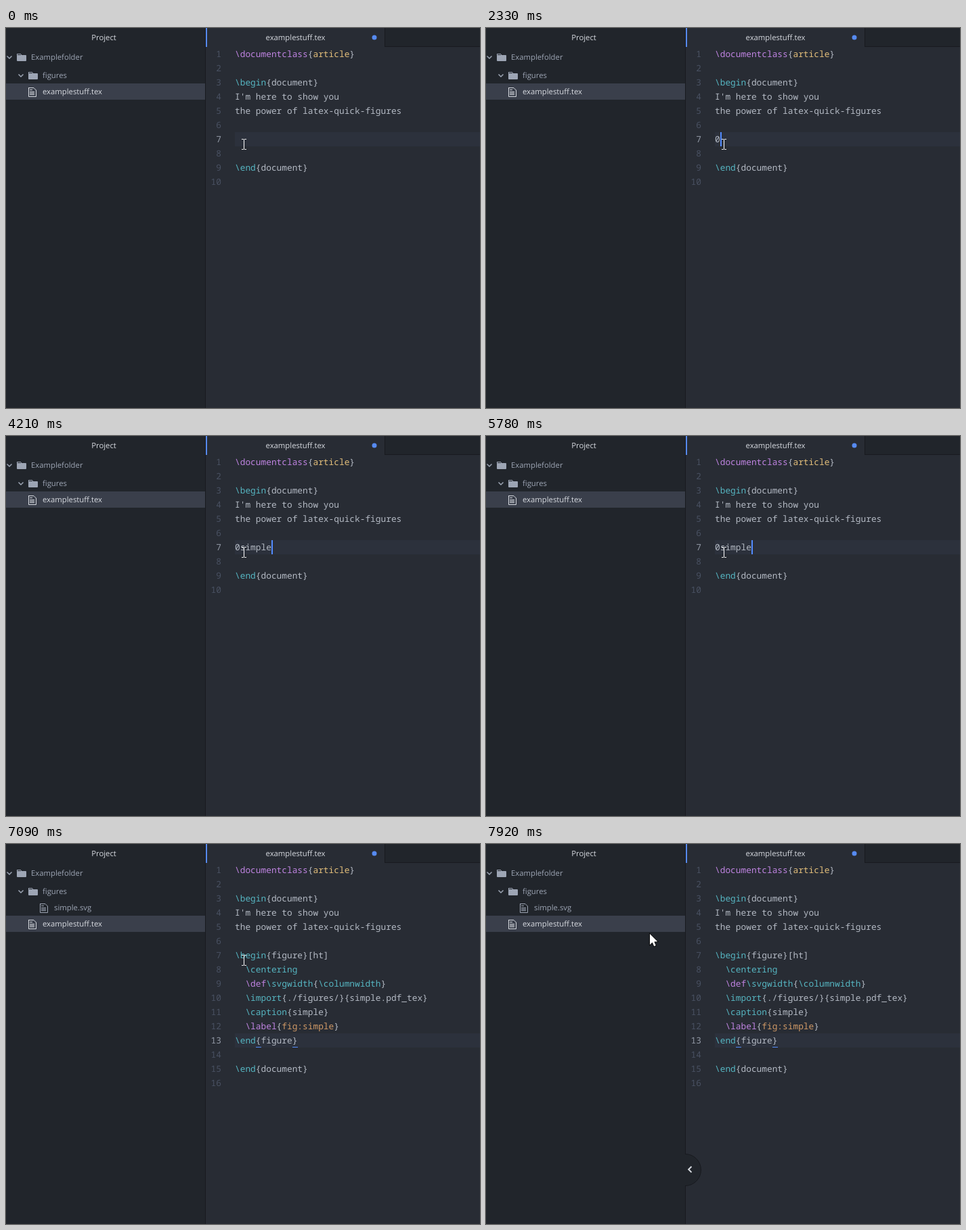
An HTML page with a canvas that plays this animation: 700x562 px, repeating every 8000 ms.

```html
<!DOCTYPE html>
<html lang="en">
<head>
<meta charset="utf-8">
<title>Editor snippet expansion</title>
<style>
  html, body { margin: 0; width: 100%; height: 100%; overflow: hidden; background: #282c34; }
  canvas { display: block; }
</style>
</head>
<body>
<canvas id="stage" width="700" height="562"></canvas>
<script>
const ctx = document.getElementById('stage').getContext('2d');
const LOOP = 8000;
const CELL = 7.697, LINE = 21, CODE_X = 338, CODE_Y = 28;
const CODE_FONT = '12.83px "Noto Sans Mono", monospace';
const UI_FONT = '11.3px "Open Sans", sans-serif';
const C = {
  editor: '#282c34', panel: '#21252b', border: '#181a1f', selected: '#3a3f4b',
  row: '#2c313c', gutter: '#495162', gutterActive: '#9299a6', accent: '#568af2',
  caret: '#528bff', ui: '#9da5b4', bright: '#d7dae0',
  text: '#b4bac4', cyan: '#56b6c2', purple: '#c084e2', yellow: '#e5c07b', orange: '#d19a66'
};

// Each line is a flat list of colour name, text pairs.
const command = (name, arg, color = 'cyan', argColor = 'text') =>
  [color, '\\' + name, 'text', '{', argColor, arg, 'text', '}'];
const indent = line => ['text', '  ', ...line];
const head = [
  command('documentclass', 'article', 'purple', 'yellow'),
  [],
  command('begin', 'document'),
  ['text', "I'm here to show you"],
  ['text', 'the power of latex-quick-figures'],
  []
];
const tail = [[], command('end', 'document'), []];
const figure = [
  [...command('begin', 'figure'), 'text', '[ht]'],
  indent(['cyan', '\\centering']),
  indent(['purple', '\\def', 'cyan', '\\svgwidth', 'text', '{', 'cyan', '\\columnwidth', 'text', '}']),
  indent([...command('import', './figures/'), 'text', '{simple.pdf_tex}']),
  indent(command('caption', 'simple')),
  indent(command('label', 'fig:simple', 'purple', 'orange')),
  command('end', 'figure')
];

const typing = [[1580, '0'], [3270, '0s'], [3360, '0si'], [3550, '0sim'],
  [3740, '0simp'], [4030, '0simpl'], [4210, '0simple']];
const EXPAND = 5970;
const caretOn = [[460, 830], [1220, 1860], [2330, 2710], [3080, 4580],
  [4950, 5330], [5780, 6250], [6710, 7090], [7460, 7830]];
// time, pointer x, pointer y, dock button offset
const pointer = [[7550, 298, 136, -22], [7640, 260, 133, -9], [7740, 249, 133, -2],
  [7830, 244, 133, 0], [7920, 242, 133, 0]];

const latest = (steps, t) => steps.filter(s => s[0] <= t).pop();

function rect(color, x, y, w, h) {
  ctx.fillStyle = color;
  ctx.fillRect(x, y, w, h);
}

function label(text, x, y, color, align = 'left') {
  ctx.font = UI_FONT;
  ctx.textAlign = align;
  ctx.fillStyle = color;
  ctx.fillText(text, x, y);
}

function polyline(points, color, width) {
  ctx.beginPath();
  points.forEach(([x, y]) => ctx.lineTo(x, y));
  ctx.strokeStyle = color;
  ctx.lineWidth = width;
  ctx.stroke();
}

function folder(name, x, cy) {
  polyline([[x - 14.5, cy - 1.5], [x - 11, cy + 2], [x - 7.5, cy - 1.5]], C.ui, 1.5);
  rect(C.ui, x, cy - 5, 6, 1);
  rect(C.ui, x, cy - 4, 1, 2);
  rect(C.ui, x + 6, cy - 4, 1, 1);
  ctx.beginPath();
  ctx.roundRect(x, cy - 3, 14, 9, 1);
  ctx.fill();
  label(name, x + 21, cy + 4, C.ui);
}

function file(name, x, cy, color) {
  polyline([[x + .5, cy - 5.5], [x + 8, cy - 5.5], [x + 11.5, cy - 2], [x + 11.5, cy + 7.5],
    [x + .5, cy + 7.5], [x + .5, cy - 6]], color, 1);
  rect(color, x + 2, cy - 3, 4, 1);
  for (let i = 0; i < 3; i++) rect(color, x + 2, cy + 2 * i, 7, 1);
  label(name, x + 21, cy + 4, color);
}

function sidebar(expanded) {
  rect(C.panel, 0, 0, 294, 562);
  rect(C.border, 294, 0, 1, 562);
  label('Project', 144.5, 18, C.bright, 'center');
  folder('Examplefolder', 16, 43);
  folder('figures', 33, 70);
  const cy = expanded ? 118 : 94;
  if (expanded) file('simple.svg', 50, 94, C.ui);
  rect(C.selected, 0, cy - 12, 294, 24);
  file('examplestuff.tex', 33, cy, C.bright);
}

function tabs() {
  rect(C.accent, 295, 0, 2, 28);
  rect(C.panel, 560, 0, 140, 27);
  rect(C.border, 559, 0, 1, 28);
  rect(C.border, 560, 27, 140, 1);
  label('examplestuff.tex', 427.5, 18, C.bright, 'center');
  ctx.beginPath();
  ctx.arc(544, 14, 3.5, 0, 7);
  ctx.fillStyle = C.accent;
  ctx.fill();
}

function codeLine(tokens, y) {
  let col = 0;
  for (let i = 0; i < tokens.length; i += 2) {
    ctx.fillStyle = C[tokens[i]];
    for (const ch of tokens[i + 1]) ctx.fillText(ch, CODE_X + CELL * col++, y);
  }
}

function editor(t, expanded) {
  const typed = (latest(typing, t) || [0, ''])[1];
  const body = expanded ? figure : [['text', typed]];
  const lines = [...head, ...body, ...tail];
  const active = expanded ? 12 : 6;
  const columns = expanded ? 12 : typed.length;
  const top = CODE_Y + LINE * active;

  rect(C.row, CODE_X, top, 700 - CODE_X, LINE);
  ctx.font = CODE_FONT;
  lines.forEach((tokens, i) => {
    const y = CODE_Y + LINE * i + 15;
    ctx.textAlign = 'right';
    ctx.fillStyle = i === active ? C.gutterActive : C.gutter;
    ctx.fillText(i + 1, 318, y);
    ctx.textAlign = 'left';
    codeLine(tokens, y);
  });
  if (expanded) {
    for (const col of [4, 11]) rect(C.caret, Math.round(CODE_X + CELL * col), top + 20, 8, 1);
  }
  if (caretOn.some(([a, b]) => t >= a && t < b) || (expanded && t < 6250)) {
    rect(C.caret, Math.round(CODE_X + CELL * columns), top, 2, LINE);
  }
}

function dockButton(offset) {
  const x = 294 + offset, y = 482;
  ctx.save();
  ctx.beginPath();
  ctx.rect(294, 450, 40, 64);
  ctx.clip();
  ctx.beginPath();
  ctx.arc(x, y, 23.5, 0, 7);
  ctx.fillStyle = C.panel;
  ctx.fill();
  ctx.strokeStyle = C.border;
  ctx.lineWidth = 1;
  ctx.stroke();
  polyline([[x + 9.5, y - 5], [x + 5.2, y - .7], [x + 9.5, y + 3.6]], C.bright, 2);
  ctx.restore();
}

function iBeam(x, y) {
  for (const dy of [0, 15]) {
    rect('#fff', x - 3, y + dy, 3, 1);
    rect('#fff', x + 1, y + dy, 3, 1);
  }
  rect('#fff', x, y + 1, 1, 14);
}

function arrow(x, y) {
  const shape = [[0, 0], [0, 16], [3.7, 12.6], [6.2, 18.2], [8.8, 17.1], [6.4, 11.6], [11.3, 11.3]];
  ctx.beginPath();
  shape.forEach(([dx, dy]) => ctx.lineTo(x + dx, y + dy));
  ctx.closePath();
  ctx.strokeStyle = '#000';
  ctx.lineWidth = 1.5;
  ctx.stroke();
  ctx.fillStyle = '#fff';
  ctx.fill();
}

function draw(t) {
  const expanded = t >= EXPAND;
  rect(C.editor, 0, 0, 700, 562);
  sidebar(expanded);
  tabs();
  editor(t, expanded);
  const moved = latest(pointer, t);
  if (moved) {
    dockButton(moved[3]);
    arrow(moved[1], moved[2]);
  } else {
    iBeam(351, 164);
  }
}

ctx.textRendering = 'geometricPrecision';
function tick() {
  draw(performance.now() % LOOP);
  requestAnimationFrame(tick);
}
tick();
</script>
</body>
</html>
```
